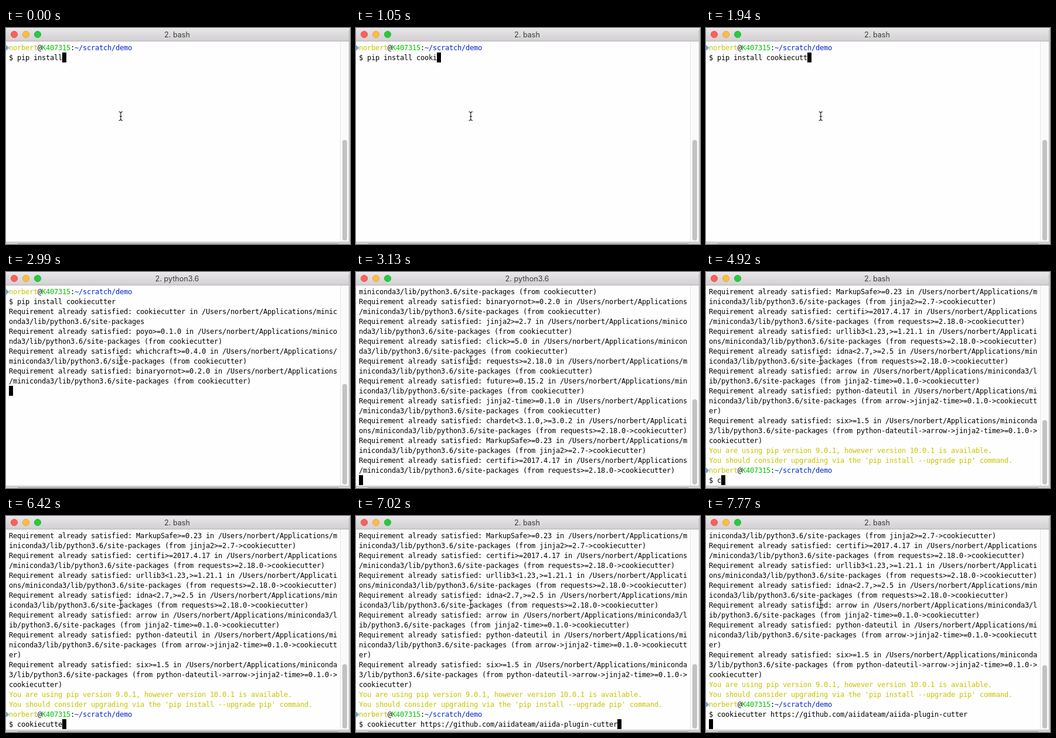
Write an HTML page with a canvas that moves like this. It is 587x370 px and loops after 8 s.

```html
<!DOCTYPE html>
<html lang="en">
<head>
<meta charset="utf-8">
<title>Terminal</title>
<style>
html, body { margin: 0; width: 100%; height: 100%; overflow: hidden; background: #d2d2d2; }
canvas { display: block; }
</style>
</head>
<body>
<canvas id="stage" width="587" height="370"></canvas>
<script>
const ctx = document.getElementById('stage').getContext('2d');
const LOOP = 8000, COLS = 80, ROWS = 20, CELL_W = 7, CELL_H = 17, LEFT = 5, TOP = 25;
const BLACK = '#000', YELLOW = '#c7c400', GREEN = '#00c200', BLUE = '#0225c7';
const MONO = '12px "DejaVu Sans Mono", monospace';
const UI = '12.6px Inter, sans-serif';

const USER = 'norbert', HOST = 'K407315';
const SITE = `/Users/${USER}/Applications/miniconda3/lib/python3.6/site-packages`;
const INSTALL = 'pip install cookiecutter';
const CREATE = 'cookiecutter https://github.com/aiidateam/aiida-plugin-cutter';

const CC = 'cookiecutter', REQ = 'requests>=2.18.0->' + CC, JT = 'jinja2-time>=0.1.0->' + CC;
const packages = [
  [CC], ['poyo>=0.1.0', CC], ['whichcraft>=0.4.0', CC], ['binaryornot>=0.2.0', CC],
  ['jinja2>=2.7', CC], ['click>=5.0', CC], ['requests>=2.18.0', CC], ['future>=0.15.2', CC],
  ['jinja2-time>=0.1.0', CC], ['chardet<3.1.0,>=3.0.2', REQ],
  ['MarkupSafe>=0.23', 'jinja2>=2.7->' + CC], ['certifi>=2017.4.17', REQ],
  ['urllib3<1.23,>=1.21.1', REQ], ['idna<2.7,>=2.5', REQ], ['arrow', JT],
  ['python-dateutil', 'arrow->' + JT], ['six>=1.5', 'python-dateutil->arrow->' + JT]
];

// [time, value]: the value holds until the next entry
const installKeys = [[0, 11], [300, 13], [450, 14], [600, 15], [900, 16], [1050, 17], [1200, 18],
  [1490, 19], [1640, 20], [1790, 21], [1940, 22], [2090, 24]];
const createKeys = [[0, 0], [4920, 1], [5070, 2], [5220, 3], [5370, 4], [5670, 6], [5820, 7],
  [6120, 8], [6270, 9], [6420, 11], [6570, 12], [6720, 13], [6870, CREATE.length]];
const listed = [[0, 0], [2990, 4], [3130, 12], [3280, packages.length]];
const titles = [[0, '2. bash'], [2840, '2. python3.6'], [3570, '2. bash']];

function valueAt(steps, t) {
  let value = steps[0][1];
  for (const [time, v] of steps) if (t >= time) value = v;
  return value;
}

function wrap(text) {
  const rows = [];
  for (let i = 0; i < text.length; i += COLS) rows.push([[text.slice(i, i + COLS), BLACK]]);
  return rows;
}

function promptRow() {
  const row = [[USER, YELLOW], ['@', BLACK], [HOST, GREEN], [':', BLACK], ['~/scratch/demo', BLUE]];
  row.mark = true;
  return row;
}

const commandRow = text => [['$ ' + text, BLACK]];

function screenRows(t) {
  const rows = [promptRow(), commandRow(INSTALL.slice(0, valueAt(installKeys, t)))];
  if (t < 2390) return rows;
  for (const [name, parent] of packages.slice(0, valueAt(listed, t))) {
    const from = parent ? ` (from ${parent})` : '';
    rows.push(...wrap(`Requirement already satisfied: ${name} in ${SITE}${from}`));
  }
  if (t >= 3280) {
    rows.push([['You are using pip version 9.0.1, however version 10.0.1 is available.', YELLOW]]);
    rows.push([["You should consider upgrading via the 'pip install --upgrade pip' command.", YELLOW]]);
    rows.push(promptRow(), commandRow(CREATE.slice(0, valueAt(createKeys, t))));
  }
  if (t < 3280 || t >= 7770) rows.push([]);
  return rows;
}

function rect(x, y, w, h, color) {
  ctx.fillStyle = color;
  ctx.fillRect(x, y, w, h);
}

function drawWindow(title) {
  rect(0, 0, 587, 370, '#d2d2d2');
  rect(20, 369, 547, 1, '#999');
  rect(0, 0, 585, 367, '#fefefe');
  rect(0, 366, 585, 1, '#c4c4c4');
  rect(585, 4, 1, 363, '#b4b4b4');

  const bar = ctx.createLinearGradient(0, 0, 0, 22);
  bar.addColorStop(0, '#e8e6e8');
  bar.addColorStop(1, '#d2d0d2');
  rect(0, 0, 585, 22, bar);
  rect(0, 0, 585, 1, '#f3f2f3');
  rect(0, 22, 585, 1, '#b2b0b2');
  [['#fc605b', '#df4744'], ['#fdbc40', '#de9f34'], ['#28c940', '#1fab2e']].forEach(([fill, edge], i) => {
    ctx.beginPath();
    ctx.arc(14 + 20 * i, 11, 5.6, 0, Math.PI * 2);
    ctx.fillStyle = fill;
    ctx.strokeStyle = edge;
    ctx.lineWidth = 0.8;
    ctx.fill();
    ctx.stroke();
  });
  ctx.font = UI;
  ctx.textAlign = 'center';
  ctx.fillStyle = '#3c3c3c';
  ctx.fillText(title, 292, 16);
  ctx.textAlign = 'left';
}

function drawScrollbar(scroll) {
  rect(570, 23, 15, 343, '#fafafa');
  rect(570, 23, 1, 343, '#e6e6e6');
  const height = 336 * ROWS / (39 + scroll);
  ctx.fillStyle = '#c2c2c2';
  ctx.beginPath();
  ctx.roundRect(574, 364 - height, 8, height, 4);
  ctx.fill();
}

function drawMark(y) {
  ctx.beginPath();
  ctx.moveTo(0, y + 4);
  ctx.lineTo(5.5, y + 9);
  ctx.lineTo(0, y + 14);
  ctx.fillStyle = '#68a9d8';
  ctx.fill();
}

function drawRow(row, y) {
  if (row.mark) drawMark(y);
  let col = 0;
  for (const [text, color] of row) {
    ctx.fillStyle = color;
    for (const ch of text) ctx.fillText(ch, LEFT + CELL_W * col++, y + 13);
  }
  return col;
}

function drawPointer() {
  ctx.beginPath();
  ctx.moveTo(192.5, 143.5);
  ctx.quadraticCurveTo(195.8, 143.5, 195.8, 146);
  ctx.quadraticCurveTo(195.8, 143.5, 199, 143.5);
  ctx.moveTo(195.8, 146);
  ctx.lineTo(195.8, 156);
  ctx.moveTo(192.5, 158.5);
  ctx.quadraticCurveTo(195.8, 158.5, 195.8, 156);
  ctx.quadraticCurveTo(195.8, 158.5, 199, 158.5);
  ctx.moveTo(194, 151.5);
  ctx.lineTo(198, 151.5);
  for (const [color, width] of [['#fff', 2.4], ['#111', 1.1]]) {
    ctx.strokeStyle = color;
    ctx.lineWidth = width;
    ctx.stroke();
  }
}

function draw(t) {
  const rows = screenRows(t);
  const scroll = Math.max(0, rows.length - ROWS);
  drawWindow(valueAt(titles, t));
  drawScrollbar(scroll);
  ctx.font = MONO;
  let col = 0, y = TOP;
  rows.slice(scroll).forEach((row, i) => {
    y = TOP + CELL_H * i;
    col = drawRow(row, y);
  });
  rect(LEFT + CELL_W * col, y, CELL_W, CELL_H, BLACK);
  drawPointer();
}

const start = performance.now();
function tick() {
  draw((performance.now() - start) % LOOP);
  requestAnimationFrame(tick);
}
tick();
</script>
</body>
</html>
```
